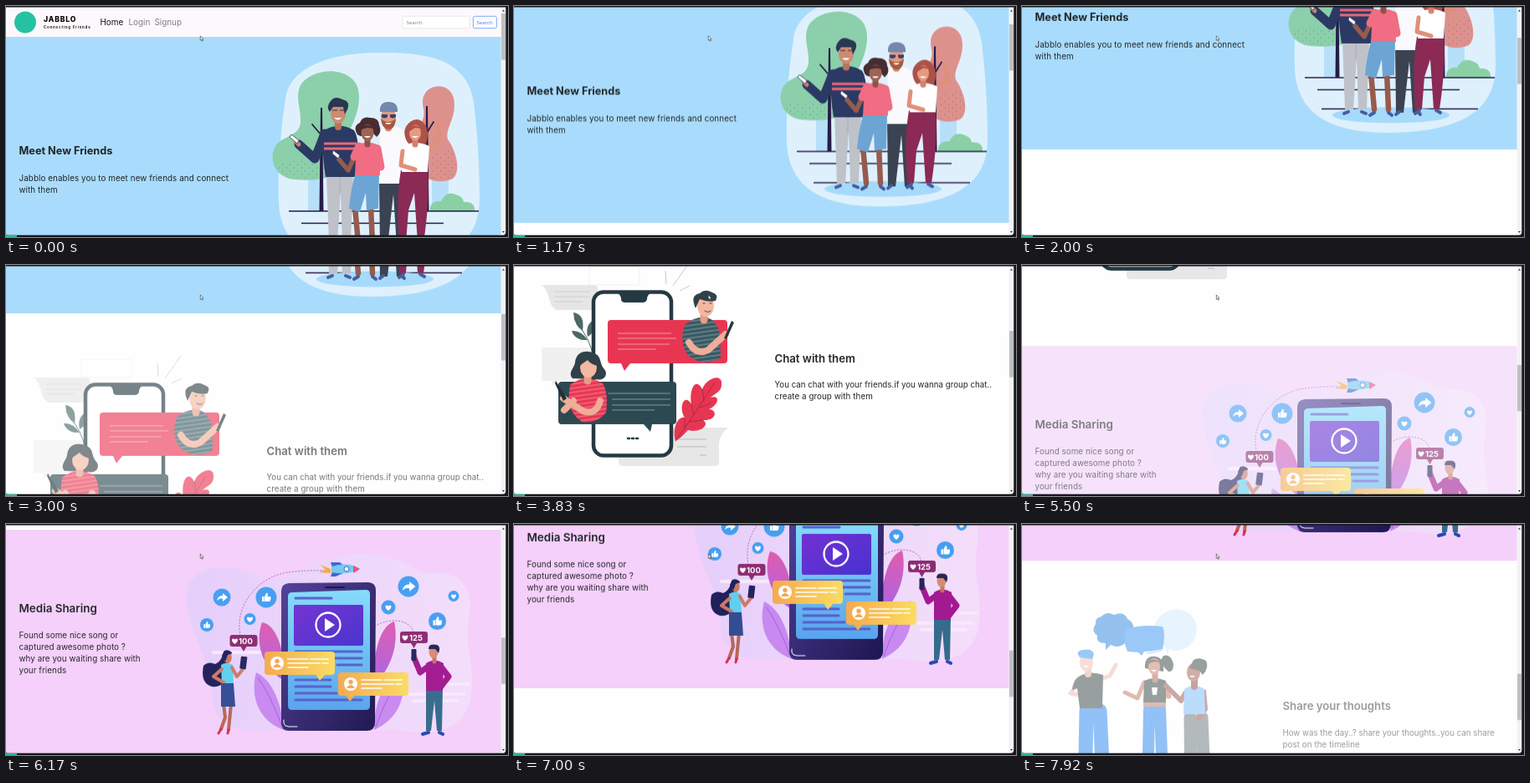
An HTML page for the animation above (8 s loop, 600x277 px).

```html
<!DOCTYPE html>
<html lang="en">
<head>
<meta charset="utf-8">
<title>Landing page scroll</title>
<style>
html, body { margin: 0; width: 100%; height: 100%; overflow: hidden; background: #fefefe; }
svg { display: block; width: 100vw; height: 100vh; font-family: Inter, "Open Sans", sans-serif; }
.title { font-size: 13.2px; font-weight: 600; fill: #212529; }
.body { font-size: 9.8px; letter-spacing: .07px; fill: #212529; }
.wide { font-size: 9.7px; letter-spacing: .02px; }
.nav { font-size: 9.9px; fill: #807d80; }
.small { font-family: "Open Sans", sans-serif; font-size: 6.1px; }
.count { font-size: 9.5px; font-weight: 700; fill: #fff; }
.limb { fill: none; stroke-linecap: round; stroke-linejoin: round; }
.line { fill: none; stroke-linecap: round; }
</style>
</head>
<body>
<svg viewBox="0 0 600 277" preserveAspectRatio="none">
<defs>
  <linearGradient id="screen" x2="0" y2="1"><stop stop-color="#84dcfb"/><stop offset="1" stop-color="#58a4ee"/></linearGradient>
  <linearGradient id="case" x2="1" y2="1"><stop stop-color="#51409a"/><stop offset="1" stop-color="#1d1650"/></linearGradient>
  <linearGradient id="video" x2="1" y2="1"><stop stop-color="#7430d2"/><stop offset="1" stop-color="#4632cf"/></linearGradient>
  <linearGradient id="gold" x2="1"><stop stop-color="#f5a94e"/><stop offset="1" stop-color="#fbdc62"/></linearGradient>
  <linearGradient id="petal" x2="0" y2="1"><stop stop-color="#e05cae"/><stop offset="1" stop-color="#a764e8"/></linearGradient>
  <linearGradient id="cloud" x2="1"><stop stop-color="#e5cffb"/><stop offset="1" stop-color="#f4defb"/></linearGradient>
  <pattern id="stripes" width="8" height="5" patternUnits="userSpaceOnUse" patternTransform="rotate(-8)"><path d="M0 1H8" stroke="#fff" stroke-width=".7" opacity=".6"/></pattern>
  <pattern id="dots" width="9" height="8" patternUnits="userSpaceOnUse"><path d="M2 2h1M6 6h1" stroke="#25484f" stroke-width="1" opacity=".5"/></pattern>
  <path id="heart" d="M0 3.6C-6-.5-3-5 0-1.8C3-5 6-.5 0 3.6Z"/>
  <path id="share" d="M-6 4C-5-1-2-2 1-2V-5L7 0L1 5V2C-2 1-4 2-6 4Z"/>
  <path id="thumb" d="M-5-1h2.5v6H-5ZM-2-1L0-5Q2-6 2-3L1.5-1H5Q6 0 5 4Q4 5 3 5H-2Z"/>
  <g id="chat">
    <rect width="84" height="28" rx="4" fill="url(#gold)"/>
    <circle cx="15" cy="14" r="8" fill="#fff"/>
    <circle cx="15" cy="11.5" r="2.7" fill="#f2a654"/><path d="M10 19Q15 11 20 19Z" fill="#f2a654"/>
    <path class="line" d="M28 9H52M55 9H76M28 14H66M69 14H76M28 19H52" stroke="#fff" stroke-width="1.7"/>
  </g>
  <g id="tag">
    <path d="M3 0H30Q33 0 33 3V11Q33 14 30 14H20L16.500 20L13 14H3Q0 14 0 11V3Q0 0 3 0Z" fill="#8c2a72"/>
    <use href="#heart" x="6" y="7.300" fill="#fff"/>
  </g>
</defs>

<rect width="600" height="277" fill="#fefefe"/>
<g id="page">
  <rect width="592" height="37" fill="#fcf8fb"/>
  <circle cx="23" cy="19.500" r="13" fill="#24c2a2"/>
  <text x="45" y="19.300" font-size="8.600" font-weight="800" letter-spacing=".85">JABBLO</text>
  <text x="45" y="26.600" font-size="4.400" font-weight="700" letter-spacing=".8" fill="#222">Connecting Friends</text>
  <text class="nav" x="112.500" y="23" style="fill:#111">Home</text>
  <text class="nav" x="146.500" y="23">Login</text>
  <text class="nav" x="177.500" y="23">Signup</text>
  <rect x="474" y="12.300" width="80.500" height="14.400" rx="2" fill="#fff" stroke="#dcdde2" stroke-width=".6"/>
  <text class="small" x="478.500" y="21.700" fill="#7b8087">Search</text>
  <rect x="558.400" y="12.300" width="28" height="14.400" rx="2" fill="#fbfaff" stroke="#5a9cfb" stroke-width=".8"/>
  <text class="small" x="562.500" y="21.700" fill="#3c86f7">Search</text>

  <rect y="37" width="592" height="295" fill="#a9dcfc"/>
  <text class="title" x="15.500" y="178.300" style="font-size:12.7px;font-weight:700">Meet New Friends</text>
  <text class="body" x="15.500" y="209.600" style="letter-spacing:.1px">Jabblo enables you to meet new friends and connect</text>
  <text class="body" x="15.500" y="223.600">with them</text>
  <g>
    <path d="M334 112C338 75 385 55 450 56C525 55 552 76 559 115C563 150 566 190 566 232C566 285 525 311 440 312C365 313 328 287 326 235C325 190 328 150 334 112Z" fill="#dff0fd"/>
    <path d="M361 200H376V246H361ZM509 200H529V246H509Z" fill="#b7dff9"/>
    <path d="M352 95C362 78 395 72 412 86C428 98 422 125 414 142C405 158 410 175 412 190C400 206 370 211 345 208C322 206 314 185 321 170C328 155 350 158 352 140C353 122 345 110 352 95Z" fill="#8ccfab"/>
    <path d="M322 190C345 182 372 186 390 195C380 209 335 214 322 190Z" fill="url(#dots)"/>
    <path d="M502 103C510 93 530 93 535 110C540 134 524 146 528 160C537 172 545 197 534 207C515 216 488 206 485 180C478 153 503 145 499 124C497 112 498 109 502 103Z" fill="#dd918d"/>
    <path d="M508 180L532 172Q544 196 532 208L506 209Z" fill="url(#dots)"/>
    <path d="M377 155L366 142M377 178L388 164M503 152L511 139" class="limb" stroke="#251c49" stroke-width="1.800"/>
    <path d="M376 122H378L379.500 246H374.500ZM502 120H504L505.500 246H500.500Z" fill="#251c49"/>
    <path d="M507 246Q506 233 520 234Q527 220 540 227Q546 229 547 235Q561 234 560 246Z" fill="#8bd0a4"/>
    <path d="M338 246H565M353 260.500H523M358 283.500H545" stroke="#251c49" stroke-width="1.600"/>
    <ellipse cx="441" cy="291" rx="70" ry="9.500" fill="#a5dafb"/>

    <path d="M446 208H479L476 288H467L463 226L456 288H447Z" fill="#3b4353"/>
    <path d="M447 147Q458 140 472 147Q482 153 480 180L478 213H446Z" fill="#fafafe"/>
    <path class="limb" d="M457 139V146" stroke="#d98c72" stroke-width="9"/>
    <ellipse cx="457" cy="133" rx="9" ry="11" fill="#e29a7d"/>
    <path d="M448 135Q457 143 466 135Q465 148 457 148Q449 147 448 135Z" fill="#a95943"/>
    <path d="M453 140Q457 144 461 140Z" fill="#fff"/>
    <path d="M447 127Q446 115 457 115Q469 115 468 127Z" fill="#7488ad"/>
    <path d="M449 130h7v3q-4 3-7 0ZM459 130h7v3q-4 3-7 0Z" fill="#324374"/>

    <path d="M383 202H415L412 284H402L400 222L396 284H386Z" fill="#bfc2c8"/>
    <path d="M399 205V225" stroke="#a6abb5" stroke-width="1"/>
    <path class="limb" d="M381 153Q374 172 369 183L350 166" stroke="#2b3a64" stroke-width="11"/>
    <path class="limb" d="M350 166L346 162" stroke="#c8806a" stroke-width="5"/>
    <path d="M341 154L350 161L348 165L339 157Z" fill="#fff" stroke="#2b3a64" stroke-width=".8"/>
    <path d="M379 150Q397 138 416 149Q422 158 420 178L418 205H382Q377 175 379 150Z" fill="#2b3a64"/>
    <path d="M380 165H419M380 171H419" stroke="#ed6878" stroke-width="3"/>
    <path class="limb" d="M397 134V145" stroke="#ba715d" stroke-width="8"/>
    <ellipse cx="397" cy="129" rx="9" ry="12" fill="#cf8b72"/>
    <path d="M387 127Q382 121 388 114Q393 107 402 112Q412 114 408 124L405 130L403 121H391Z" fill="#293752"/>
    <path d="M390 125h6m3 0h6" stroke="#293752" stroke-width="1"/><path d="M392 134Q397 139 401 134Z" fill="#fff"/>

    <path class="limb" d="M417 240L421 284M436 240L438 284" stroke="#965b4d" stroke-width="6.500"/>
    <path d="M418 199H446L445 243L431 245L430 224L423 247L410 243Q412 220 418 199Z" fill="#6ca5d4"/>
    <path class="limb" d="M421 171L409 197L398 184" stroke="#965b4d" stroke-width="5.500"/>
    <path class="limb" d="M422 168L416 181M444 171L448 193" stroke="#f06d83" stroke-width="9"/>
    <path d="M419 167Q432 160 446 167L447 203H417Z" fill="#f06d83"/>
    <path d="M391 173L399 179L397 183L390 177Z" fill="#fff" stroke="#2b3a64" stroke-width=".8"/>
    <path d="M420 154Q414 144 423 140Q426 132 435 134Q446 134 446 143Q450 151 443 157Q438 151 432 149Q427 160 420 154Z" fill="#482c31"/>
    <path class="limb" d="M432 158V166" stroke="#8d5349" stroke-width="7"/>
    <ellipse cx="432" cy="152" rx="7.500" ry="10" fill="#9d6454"/><path d="M424 148Q430 138 440 147L432 146Z" fill="#482c31"/>
    <path d="M428 156Q432 160 436 156Z" fill="#fff"/>

    <path d="M472 197H504Q507 230 499 284H492L488 224L481 245L478 284H470Q466 230 472 197Z" fill="#8a2a55"/>
    <path class="limb" d="M504 172L518 160L516 142" stroke="#df9079" stroke-width="5"/>
    <path d="M479 162Q472 148 483 139Q492 132 500 141Q507 150 502 166H482Z" fill="#ad5247"/>
    <path d="M474 168Q489 160 506 168L504 199H473Z" fill="#fff"/>
    <path class="limb" d="M474 174L472 191L489 196" stroke="#df9079" stroke-width="5"/>
    <path class="limb" d="M489 156V166" stroke="#d48270" stroke-width="7"/>
    <ellipse cx="489" cy="152" rx="7" ry="9.500" fill="#e69b80"/><path d="M481 151Q483 138 497 147L489 146Z" fill="#ad5247"/><path d="M485 156Q489 160 493 156Z" fill="#fff"/>
    <path class="limb" d="M390 287L385 289M406 287L411 289M421 288L416 291M438 288L442 291M451 287L447 290M473 287L476 290M475 285L470 289M495 285L500 288" stroke="#465c9c" stroke-width="4"/>
  </g>

  <g id="talk" transform="translate(0 274)">
    <text class="title" x="311.500" y="227.500">Chat with them</text>
    <text class="body wide" x="311.500" y="258">You can chat with your friends.if you wanna group chat..</text>
    <text class="body" x="311.500" y="272">create a group with them</text>
    <path d="M33 135H96Q100 135 100 139V165H50L45 160L43 155Q39 138 33 135Z" fill="#e6e6e6"/>
    <path d="M33 210H95V250H52L45 256V250H33Z" fill="#f0f0f1"/>
    <path d="M90 113H150V135H90Z" fill="none" stroke="#f1f1f1"/>
    <path d="M48 143H90M48 149H90M48 155H82" stroke="#cfcfcf"/>
    <path d="M126 306H256Q246 314 245 325V348Q245 352 240 352H130Q125 352 125 347Z" fill="#e7e7e8"/>
    <path d="M195 320H230M195 329H230M222 339H230" stroke="#d0d0d0" stroke-width="2"/>
    <path d="M181 118L182 134M190 136L209 109M198 142L210 136" stroke="#b8bcbf" stroke-width=".8"/>
    <path d="M95 222Q92 200 72 176" class="line" stroke="#4b6865"/>
    <path d="M82 190Q72 184 71 168Q85 170 82 190ZM88 201Q80 189 69 190Q73 202 88 201ZM88 197Q85 183 95 177Q101 189 88 197Z" fill="#4b6865"/>
    <rect x="95" y="143.500" width="93" height="196" rx="12" fill="#fff" stroke="#243942" stroke-width="4.500"/>
    <path d="M123 144H164Q159 147 159 152Q158 156 154 156H133Q128 156 128 152Q128 147 123 144Z" fill="#243942"/>
    <path d="M136 319h2m3 0h2m3 0h2" class="line" stroke="#243942" stroke-width="2.600"/>
    <path d="M116 177H251Q255 177 255 181V225Q255 229 251 229H139L132 238L128 229H116Q112 229 112 225V181Q112 177 116 177Z" fill="#e83652"/>
    <path d="M124 193H188M124 199H194M124 206H186M124 212H170" stroke="#f6a2ae" stroke-width=".9"/>
    <path d="M193 322C189 308 195 292 204 294C196 281 204 264 212 278C209 260 217 245 225 260C230 246 250 240 248 255C248 263 239 266 235 270C246 266 246 278 233 284C244 285 242 298 226 297C235 303 222 313 208 309C202 315 199 319 193 322Z" fill="#e83652"/>
    <path d="M193 322Q215 292 239 253M204 307L204 295M210 299L226 297M215 291L212 278M222 282L235 277M227 273L225 260" class="line" stroke="#8d2d40" stroke-width=".8"/>
    <path d="M204 183Q216 172 231 174Q243 178 246 195L247 222Q226 235 208 219Q197 205 204 183Z" fill="#365962"/>
    <path d="M204 183Q216 172 231 174Q243 178 246 195L247 222Q226 235 208 219Q197 205 204 183Z" fill="url(#stripes)"/>
    <path class="limb" d="M209 204Q218 220 232 213L253 194" stroke="#f0ad97" stroke-width="8"/>
    <path d="M251 199L260 178L263 180L254 200Z" fill="#243942"/>
    <path class="limb" d="M227 165V177" stroke="#e69d87" stroke-width="9"/>
    <ellipse cx="229" cy="160" rx="10" ry="13" fill="#f4b8a1"/>
    <path d="M217 163Q210 147 222 145Q228 139 237 144Q245 146 241 154Q232 156 222 152Z" fill="#304149"/>
    <path d="M226 157h2m6 0h2M228 166q4 3 7 0" class="line" stroke="#304149"/>
    <path d="M57 251H190Q194 251 194 255V298Q194 302 190 302H165L163 311L155 302H57Q53 302 53 298V255Q53 251 57 251Z" fill="#2c4952"/>
    <path d="M112 265H187M117 272H187M117 279H187M117 285H168" stroke="#8fa3a7" stroke-width=".9"/>
    <path d="M70 247C64 240 72 235 73 228C74 215 86 212 96 217C105 220 102 230 108 236C113 242 108 251 98 248Z" fill="#304149"/>
    <path d="M67 255Q86 240 106 253Q113 264 110 288Q99 302 81 299Q61 286 67 255Z" fill="#e83652"/>
    <path d="M67 255Q86 240 106 253Q113 264 110 288Q99 302 81 299Q61 286 67 255Z" fill="url(#stripes)"/>
    <path class="limb" d="M88 240V250" stroke="#e69d87" stroke-width="9"/>
    <ellipse cx="89" cy="234" rx="10" ry="12" fill="#f4b8a1"/>
    <path d="M78 232Q80 217 98 224L100 232Q91 230 88 225Z" fill="#304149"/>
    <path class="limb" d="M103 274Q98 292 82 286L59 271M71 274L60 285" stroke="#f0ad97" stroke-width="8"/>
    <path d="M50 250L63 271L59 274L49 253Z" fill="#1f2e35"/>
  </g>

  <rect y="706" width="592" height="275" fill="#f9f9fc"/>
  <g id="media" transform="translate(0 699)">
    <rect y="7" width="592" height="275" fill="#f5d0fa"/>
    <text class="title" x="15.500" y="105.700" style="font-size:13.4px">Media Sharing</text>
    <text class="body" x="15.500" y="137">Found some nice song or</text>
    <text class="body" x="15.500" y="151">captured awesome photo ?</text>
    <text class="body" x="15.500" y="165">why are you waiting share with</text>
    <text class="body" x="15.500" y="179">your friends</text>
    <path d="M216 92C213 52 260 42 300 62C335 75 355 46 400 38C445 30 475 45 500 59C545 55 560 75 553 115C548 145 560 165 556 205C550 250 505 255 470 247H320C270 252 245 235 247 205C249 175 220 135 216 92Z" fill="url(#cloud)"/>
    <path d="M248 154H310M472 204H548M487 212H540M515 192H553" class="line" stroke="#f8e8fc" stroke-width="4"/>
    <path d="M281 138C270 94 306 62 337 58Q360 55 382 56M424 142C435 112 482 108 487 130" fill="none" stroke="#b05ca7" stroke-width=".9" stroke-dasharray="2 1.700"/>
    <path d="M333 188C306 173 297 142 306 118C321 120 333 145 333 188ZM440 193C438 150 449 121 464 117C470 145 460 174 440 193Z" fill="url(#petal)"/>
    <path d="M332 247C300 235 292 205 299 178C316 186 329 210 332 247ZM440 247C440 210 453 188 474 177C479 208 469 234 440 247Z" fill="#c889f0"/>
    <path d="M330 243Q316 205 301 184M442 243Q455 206 472 184" fill="none" stroke="#9858d2" stroke-width=".8"/>
    <path d="M338 71L433 70Q442 70 442 80L441 238Q441 248 431 248H338Q329 248 329 238V80Q329 72 338 71Z" fill="url(#case)"/>
    <path d="M342 82L430 79Q435 79 435 84V218Q435 223 430 223H342Q337 223 337 218V87Q337 82 342 82Z" fill="url(#screen)"/>
    <path d="M382 76H404" class="line" stroke="#171346" stroke-width="2"/>
    <path d="M332 235V239Q333 243 338 243H348" class="line" stroke="#fff" stroke-width="1"/>
    <rect x="344" y="97" width="83" height="49" rx="2" fill="url(#video)"/>
    <circle cx="385" cy="121" r="14.500" fill="none" stroke="#fff" stroke-width="2.300"/><path d="M381 113L393 121L381 129Z" fill="#fff"/>
    <path d="M346 89H389M346 153H425M346 161H425M396 169H425M346 187H388M346 195H388M346 203H395M346 211H425" class="line" stroke="#565fcb" stroke-width="3"/>
    <g fill="#459ef1"><circle cx="258" cy="88" r="10.500"/><circle cx="311" cy="88" r="12.500"/><circle cx="291.500" cy="114" r="7"/><circle cx="240" cy="121" r="8"/><circle cx="457" cy="100" r="8.500"/><circle cx="481" cy="75" r="12.500"/><circle cx="535" cy="86.500" r="6.500"/><circle cx="515.500" cy="116.500" r="10.500"/></g>
    <g fill="#fff"><use href="#share" x="258" y="88"/><use href="#thumb" x="311" y="88"/><use href="#heart" x="291.500" y="114.500"/><use href="#thumb" transform="translate(240 121) scale(.75)"/><use href="#heart" x="457" y="100.500"/><use href="#share" transform="translate(481 75) scale(1.200)"/><use href="#heart" transform="translate(535 87) scale(.85)"/><use href="#thumb" x="515.500" y="116.500"/></g>
    <path d="M388 54L376 49L382 55L374 58L388 59Z" fill="#f6a844"/>
    <path d="M388 46H399L405 51V58L394 63H388L391 55Z" fill="#3964cf"/>
    <path d="M389 51Q410 45 423 54Q409 62 389 58Z" fill="#72c9f2"/><path d="M415 50L423 54L415 59Z" fill="#e94e80"/>
    <circle cx="407" cy="54" r="3" fill="#fff" stroke="#3964cf"/>
    <path d="M370 180L375 188L382 180Z" fill="#fbd45e"/><use href="#chat" x="309" y="153"/>
    <path d="M405 204L411 213L418 204Z" fill="#f5b050"/><use href="#chat" x="397" y="178"/>
    <use href="#tag" x="267.500" y="133"/><text class="count" x="278" y="143.600">100</text>
    <use href="#tag" x="471" y="129"/><text class="count" x="482" y="139.600">125</text>

    <path class="limb" d="M260 216L262 232L257 246M269 216L266 247" stroke="#b86654" stroke-width="4"/>
    <path class="line" d="M257 246L254 251M266 247L265 251" stroke="#d72d53" stroke-width="3"/>
    <path d="M260 153Q264 149 270 154L265 169Q264 198 246 195Q232 191 236 170Q242 164 250 168Q258 165 260 153Z" fill="#20205a"/>
    <path d="M257 169Q264 164 271 169L272 193H258Z" fill="#5fd0f0"/>
    <path class="limb" d="M270 172L276 183L284 173M258 174L248 183L260 190" stroke="#cb7966" stroke-width="4"/>
    <path d="M257 191H272L274 219H257Z" fill="#334c94"/>
    <ellipse cx="265" cy="160" rx="4.800" ry="7" fill="#cb7966"/><path d="M258 158Q263 148 270 155L265 157L262 165Z" fill="#20205a"/>
    <rect x="280" y="159" width="7.500" height="15" rx="1" fill="#24245f" transform="rotate(7 284 167)"/>
    <path d="M502 196H522L521 248H515L512 212L508 248H502Z" fill="#356b8c"/>
    <path class="line" d="M505 250L498 252M518 250L522 252" stroke="#2945b6" stroke-width="4"/>
    <path class="limb" d="M507 169L495 178L488 161M519 170L529 183L519 196" stroke="#a21990" stroke-width="7"/>
    <path d="M502 167Q512 160 523 167L522 200H502Z" fill="#a21990"/>
    <path class="limb" d="M512 158V165M489 160L488 157" stroke="#c47462" stroke-width="5"/>
    <ellipse cx="511" cy="153" rx="5.500" ry="8" fill="#d88b73"/><path d="M505 150Q505 143 515 145Q520 147 517 155L513 150Z" fill="#262457"/>
    <rect x="484.500" y="150" width="6" height="14" rx="1" fill="#24245f"/>
  </g>

  <g id="thoughts" transform="translate(0 937)">
    <text class="title" x="311.500" y="222.600">Share your thoughts</text>
    <text class="body wide" x="311.500" y="253.800">How was the day..? share your thoughts..you can share</text>
    <text class="body" x="311.500" y="267.800">post on the timeline</text>
    <path d="M163 113C176 97 202 99 208 120C213 144 189 157 176 150L174 156L171 147C156 138 156 122 163 113Z" fill="#cce6fc"/>
    <path d="M95 111Q101 104 110 109Q122 104 126 114Q136 119 132 130Q133 141 123 143Q115 150 106 145L100 151V143Q88 143 90 134Q82 128 88 120Q87 112 95 111Z" fill="#1476db"/>
    <path d="M124 126Q144 120 168 123Q172 132 168 150Q156 153 146 153L143 158L139 154L126 153Q120 140 124 126Z" fill="#208af2"/>
    <path class="line" d="M150 155Q160 154 168 151" stroke="#208af2" stroke-width=".8"/>

    <path class="limb" d="M77 224L75 330M93 224L98 330" stroke="#0d78ec" stroke-width="17"/>
    <path class="limb" d="M70 187L58 203L78 207M97 185L105 182L112 169" stroke="#ebb4a6" stroke-width="5"/>
    <path d="M68 183Q81 175 97 181L96 221H69L66 197L60 199Q61 187 68 183Z" fill="#1b2c2c"/>
    <path class="limb" d="M79 172V180" stroke="#dfa494" stroke-width="8"/>
    <ellipse cx="77" cy="166" rx="8" ry="11" fill="#efb8a8"/><path d="M67 157Q65 152 73 151Q84 149 86 156L84 162L69 160Z" fill="#208af2"/>
    <path d="M73 170Q77 174 80 170Z" fill="#fff"/>

    <path class="limb" d="M152 222L150 330M165 222L169 330" stroke="#0d78ec" stroke-width="14"/>
    <path d="M169 158Q178 155 181 168Q181 178 175 177Q168 171 166 163Z" fill="#1b2c2c"/>
    <path d="M147 173Q146 157 160 159Q171 161 169 177Z" fill="#1b2c2c"/>
    <path class="limb" d="M146 190L138 209L123 202M171 192L176 207L159 203" stroke="#bf654e" stroke-width="5"/>
    <path d="M146 188Q158 182 172 188L172 214H145Z" fill="#1b2c2c"/>
    <path d="M145 214H172V219H145Z" fill="#bf654e"/>
    <path class="limb" d="M159 177V187" stroke="#a94f40" stroke-width="7"/>
    <ellipse cx="158" cy="171" rx="7" ry="10" fill="#c76f58"/><path d="M150 168Q155 158 165 166L158 165Z" fill="#1b2c2c"/>
    <path d="M154 175Q158 179 161 175Z" fill="#fff"/><path d="M155 196H162L161 205H156Z" fill="#fff"/>

    <path class="limb" d="M201 232L202 330M215 232L219 330" stroke="#59686b" stroke-width="15"/>
    <path class="limb" d="M195 203L190 212L172 194M217 201L219 222L211 233" stroke="#8e3f36" stroke-width="6"/>
    <path d="M194 198Q206 190 218 198L219 228H193Z" fill="#6db4fb"/>
    <path class="limb" d="M206 183V195" stroke="#803530" stroke-width="8"/>
    <ellipse cx="205" cy="178" rx="8" ry="11" fill="#994b40"/>
    <path d="M200 173L205 163Q212 159 220 164Q224 172 216 181L212 176Z" fill="#1b2c2c"/>
    <path d="M200 182Q204 186 207 182Z" fill="#fff"/>
  </g>
</g>

<rect x="591.500" width="6" height="277" fill="#f3f3f4"/>
<rect id="scrollThumb" x="592" y="9" width="5" height="55.500" fill="#bfc0c2"/>
<path d="M593 6.500L594.500 4.500L596 6.500ZM593 270L594.500 272L596 270Z" fill="#333"/>
<path d="M0 0H600V277H0V274.700H594Q597.300 274.700 597.300 271V1.600H0Z" fill="#14171b"/>
<path d="M0 272Q0 275 4 275H13V277H0Z" fill="#2fb596"/>
<path d="M232.300 35.800V41.200L233.500 40.200L234.400 42.200L235.300 41.800L234.400 39.900H236Z" fill="#fff" stroke="#222" stroke-width=".55"/>
</svg>
<script>
const LOOP = 8000;
const FADE = 1800;
const SAMPLES = 80;
const scroll = [[0, 0], [500, 0], [2000, 160], [3000, 274], [4750, 508], [6170, 699], [7000, 784], [7920, 937], [8000, 945]];
const fadeStart = { talk: 1950, media: 4500, thoughts: 7080 };

function play(id, frames) {
  document.getElementById(id).animate(frames, { duration: LOOP, iterations: Infinity });
}

function follow(id, rate) {
  play(id, scroll.map(([t, y]) => ({ offset: t / LOOP, transform: `translateY(${y * rate}px)` })));
}

function smooth(x) {
  const p = Math.min(1, Math.max(0, x));
  return p * p * (3 - 2 * p);
}

follow('page', -1);
follow('scrollThumb', 0.182);

// Evenly spaced samples let the last fade be cut off by the loop.
for (const [id, start] of Object.entries(fadeStart)) {
  play(id, Array.from({ length: SAMPLES + 1 }, (_, i) => ({
    opacity: smooth((i * LOOP / SAMPLES - start) / FADE)
  })));
}
</script>
</body>
</html>
```
